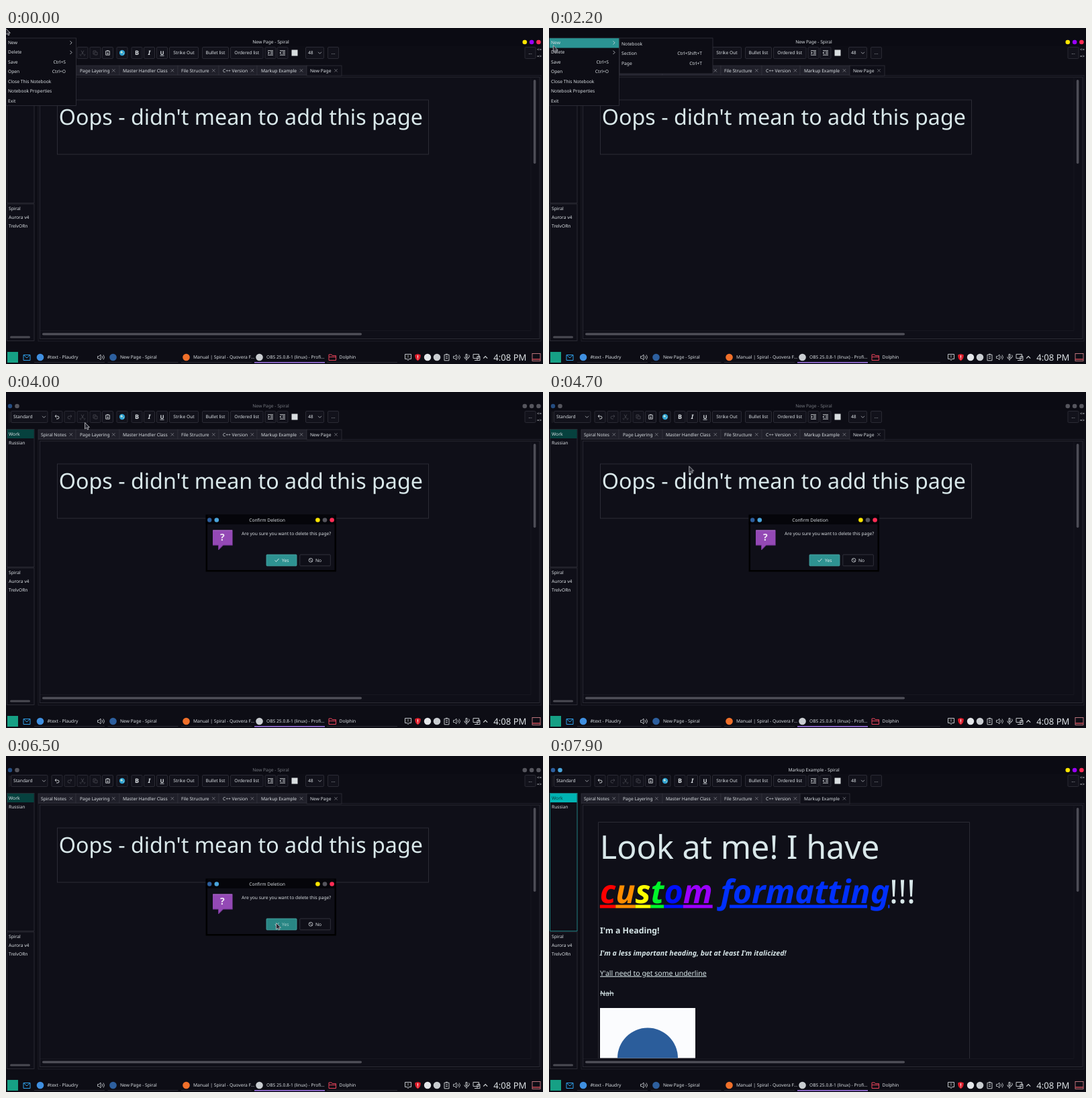
An HTML page for the animation above (8000 ms loop, 800 by 500 pixels).

```html
<!DOCTYPE html>
<html lang="en">
<head>
<meta charset="utf-8">
<title>Deleting a page</title>
<style>
html, body { margin: 0; width: 100%; height: 100%; overflow: hidden; background: #0d0d15; }
svg { display: block; width: 800px; height: 500px; }
text { font-family: "Noto Sans", sans-serif; font-size: 6.7px; fill: #dbe0e4; white-space: pre; text-rendering: geometricPrecision; }
.mid { text-anchor: middle; }
.end { text-anchor: end; }
.b { font-weight: 700; }
.i { font-style: italic; }
.dim { fill: #767980; }
.doc { fill: #d9e8ea; }
.u { text-decoration: underline; text-decoration-skip-ink: none; }
.s { text-decoration: line-through; }
#cursor { animation: move 8s infinite; }
@keyframes move {
  0% { transform: translate(-1px, 0); animation-timing-function: step-end; }
  21.25% { transform: translate(1px, 8px); animation-timing-function: steps(2); }
  23.75% { transform: translate(4px, 17px); animation-timing-function: steps(5); }
  30% { transform: translate(7px, 31px); animation-timing-function: step-end; }
  33.75% { transform: translate(13px, 31px); animation-timing-function: steps(5); }
  40% { transform: translate(113px, 43px); animation-timing-function: steps(3); }
  43.75%, 56.25% { transform: translate(117px, 45px); animation-timing-function: steps(5); }
  62.5% { transform: translate(345px, 207px); animation-timing-function: steps(3); }
  66.25%, 100% { transform: translate(402px, 248px); }
}
</style>
</head>
<body>
<svg id="stage" viewBox="0 0 800 500" xmlns="http://www.w3.org/2000/svg"></svg>
<script>
const LOOP = 8000, TEAL = '#2b9393', LINE = '#31313b', INK = '#d5dadd', OFF = '#43444c';
let css = '', count = 0;

const text = (x, y, s, cls = '', style = '') => `<text x="${x}" y="${y}" class="${cls}" style="${style}">${s}</text>`;
const rect = (x, y, w, h, fill, stroke = 'none', r = 0) =>
  `<rect x="${x}" y="${y}" width="${w}" height="${h}" rx="${r}" fill="${fill}" stroke="${stroke}" stroke-width=".8"/>`;
const dot = (x, y, r, fill) => `<circle cx="${x}" cy="${y}" r="${r}" fill="${fill}"/>`;
const path = (d, stroke = INK, w = .9, fill = 'none') => `<path d="${d}" stroke="${stroke}" stroke-width="${w}" fill="${fill}"/>`;
const at = (x, y, s) => `<g transform="translate(${x} ${y})">${s}</g>`;

// Shows its content only from a to b (ms) of each loop.
function during(a, b, s) {
  const name = 'show' + count++;
  css += `@keyframes ${name}{0%{opacity:0}${a / LOOP * 100}%{opacity:1}${b / LOOP * 100}%{opacity:${b < LOOP ? 0 : 1}}}`;
  return `<g style="animation:${name} ${LOOP}ms step-end infinite">${s}</g>`;
}

const arrowDown = (x, y) => path(`M${x - 2.5} ${y - 1.2}l2.5 2.5l2.5 -2.5`, '#a5a9ae');
const cross = (x, y) => path(`M${x - 2.2} ${y - 2.2}l4.4 4.4m0 -4.4l-4.4 4.4`, '#8a8c92', .7);
const button = (x, w, s = '') => rect(x, 28.5, w, 17, '#12121b', LINE, 1.5) + s;

function titleBar(title, on) {
  const lights = on ? ['#ffe500', '#9a00ff', '#ff2d55'] : ['#55555d', '#55555d', '#55555d'];
  return dot(6, 21, 3.2, on ? '#2d5f9e' : '#244c80') + dot(16.5, 21, 3.3, on ? '#4aa5dc' : '#55555d') +
    text(394.5, 23.3, title + ' - Spiral', on ? 'mid' : 'mid dim') +
    lights.map((c, i) => dot(772.8 + i * 10.3, 21, 3.3, c)).join('');
}

function toolbar() {
  const icons = [
    [76, INK, 'M-1 -3l-2 2l2 2M-3 -1h4a2 2 0 0 1 0 4h-2'],
    [95, OFF, 'M1 -3l2 2l-2 2M3 -1h-4a2 2 0 0 0 0 4h2'],
    [114, OFF, 'M-2 -3.5l3.5 6M2 -3.5l-3.5 6M-2.8 2a1 1 0 1 0 1 1.5M2.8 2a1 1 0 1 1 -1 1.5'],
    [133, OFF, 'M-3 -3h4v1M-3 -3v5h1M-1 -1h4v4h-4z'],
    [151.5, INK, 'M-2.8 -2.8h5.6v6h-5.6zM-1.2 -3.3h2.4M-1.2 0h2.4M-1.2 1.6h2.4'],
    [394, INK, 'M-4 -3.3h8M0 -1.2h4M0 1h4M-4 3.2h8M-4 -1.5l2.4 1.5l-2.4 1.5'],
    [412, INK, 'M-4 -3.3h8M0 -1.2h4M0 1h4M-4 3.2h8M-1.7 -1.5l-2.4 1.5l2.4 1.5']
  ];
  return path('M4.5 29v17M6 29v17', '#25252e', .6) +
    button(7.5, 54.5, text(11, 39.4, 'Standard') + arrowDown(56.5, 37)) +
    icons.map(([x, c, d]) => button(x - 8, 16, at(x, 37, path(d, c)))).join('') +
    button(165, 16, dot(173, 37, 4.2, '#2d9fd0') + path('M171 34.5l2 0l1 2l-2 1.5l-1.5 -1.5zM174.5 37.5l1.5 .5l-1 2z', 'none', 0, '#bfe3d4')) +
    button(187, 16, text(195, 40.3, 'B', 'mid b', 'font-size:9px')) +
    button(205.5, 16, text(213.5, 40.3, 'I', 'mid b i', 'font-size:9px')) +
    button(224.5, 16, text(232.5, 39.8, 'U', 'mid b u', 'font-size:8px')) +
    button(243.5, 43, text(265, 39.4, 'Strike Out', 'mid')) +
    button(292.5, 39, text(312, 39.4, 'Bullet list', 'mid')) +
    button(334.5, 48.5, text(358.7, 39.4, 'Ordered list', 'mid')) +
    rect(425.5, 32.5, 9, 9, '#d9dee0') +
    button(446.5, 27, text(450, 39.4, '48') + arrowDown(467.5, 37)) +
    button(479.5, 16, text(487.5, 39, '...', 'mid')) + button(773, 16, text(781, 39, '...', 'mid')) +
    text(791, 33.8, '&lt;=', '', 'font-size:6px') + text(791, 44.3, '=&gt;', '', 'font-size:6px');
}

function tab(x, w, label, tx, cx, on) {
  return rect(x, 56, w, on ? 15 : 14, on ? '#0f0f18' : '#20202a', LINE) + text(tx, 65.8, label) + cross(cx, 63.3);
}

function frame() {
  return rect(0, 0, 800, 500, '#0d0d15') + rect(0, 0, 800, 27, '#0b0b13') + toolbar() +
    rect(1.5, 55.5, 40.5, 205, '#0f0f18', LINE) + rect(1.5, 262, 40.5, 203.5, '#0f0f18', LINE) +
    ['Spiral', 'Aurora v4', 'TrelvORn'].map((s, i) => text(4, 271 + i * 12.9, s)).join('') +
    rect(6, 458.5, 30, 3, '#4a4a52', 'none', 1.5) +
    rect(48, 70.5, 749, 395.5, '#0d0d15', '#25252e') + rect(50.5, 73, 744.5, 389.5, '#0f0f18', LINE) +
    path('M782 74v376M51 450.5h731', '#1b1b24', .7) +
    rect(785.8, 77, 3.6, 125, '#4d4d56', 'none', 1.8) + rect(54, 453.8, 476, 3.4, '#4d4d56', 'none', 1.7) +
    tab(48, 56, 'Spiral Notes', 52, 96.8) + tab(104, 65, 'Page Layering', 110, 160.3) +
    tab(169, 87, 'Master Handler Class', 174, 247.8) + tab(256, 61, 'File Structure', 261, 309.3) +
    tab(317, 57, 'C++ Version', 323, 366.8);
}

const sidebar = on => rect(2, 55.8, 39.7, 13.2, on ? '#00b3b3' : '#06413e') +
  (on ? rect(1.5, 55.5, 40.5, 205, 'none', '#168a8a') : '') +
  text(4, 65, 'Work', '', on ? 'fill:#0b3c3f' : '') + text(4, 77.8, 'Russian');

const wrongPage = () => tab(374, 74, 'Markup Example', 380, 440) + tab(448, 52, 'New Page', 453, 491.5, true) +
  rect(76.5, 107, 553, 81, 'none', '#33333d') + text(78.8, 143.8, "Oops - didn't mean to add this page", 'doc', 'font-size:32.25px');

function markupPage() {
  const hues = ['#ff0000', '#ff8c00', '#ffff00', '#00f52a', '#0010ff', '#9b00ff'];
  const rainbow = [...'custom'].map((c, i) => `<tspan class="u" style="fill:${hues[i]}">${c}</tspan>`).join('');
  return tab(374, 74, 'Markup Example', 380, 440, true) +
    path('M73.5 450V98.5H626.5V450', '#33333d', .8) +
    text(75.8, 152.5, 'Look at me! I have', 'doc', 'font-size:48.5px') +
    text(75.8, 218.5, rainbow, 'b i', 'font-size:48.5px') +
    text(255.6, 218.5, 'formatting', 'b i u', 'font-size:48.5px;fill:#0030ff') +
    text(507, 218.5, '!!!', 'doc', 'font-size:48.5px') +
    text(76, 263.7, "I'm a Heading!", 'doc b', 'font-size:12.3px') +
    text(75.8, 296.7, "I'm a less important heading, but at least I'm italicized!", 'doc b i', 'font-size:10.6px') +
    text(76.1, 326.7, "Y'all need to get some underline", 'doc u', 'font-size:10.5px') +
    text(76.1, 356.5, 'Nah', 'doc s', 'font-size:10.5px') +
    rect(76, 375, 142, 74.5, '#fbfcfe') + path('M102 449.5a45 45 0 0 1 90 0z', 'none', 0, '#2b5d9b');
}

function taskbar() {
  const speaker = path('M-4.5 -1.5h2l2.5 -2.5v8l-2.5 -2.5h-2zM2 -2q2 2 0 4M4 -3.5q3 3.5 0 7', INK, .8);
  const tasks = [
    [42, 51, '#3f8fe0', '#text - Plaudry'], [151.5, 159.5, '#2d5f9e', 'New Page - Spiral'],
    [261, 268.5, '#f0702a', 'Manual | Spiral - Quovera F...'], [370, 377.5, '#c9cdd1', 'OBS 25.0.8-1 (linux) - Profi...'],
    [478, 486, '', 'Dolphin']
  ];
  return rect(0, 479, 800, 21, '#0d0d15') + rect(2, 482, 16, 16, '#16a085') +
    path('M26 486.5h10v8h-10zl5 4.5l5 -4.5', '#2f9fe8', 1) +
    tasks.map(([x, ix, c, s], i) => (c ? dot(ix, 490, 5.3, c) : '') + text(ix + 10.5, 492.4, s) +
      rect(x, 497, 105, i == 3 ? 1.5 : .8, i == 3 ? '#a77bf0' : '#34343e')).join('') +
    path('M481 494.5v-8.5h4l1 1.5h5.5v7zM481 489.5h10.5', '#e8435a', 1) +
    at(141, 490, speaker) +
    path('M594.5 485.5h9v7h-3l-1.5 2l-1.5 -2h-3zM599 487v2.5M599 490.5v1') +
    path('M613.5 485l4.2 1.3q.6 6 -4.2 9q-4.8 -3 -4.2 -9z', 'none', 0, '#e01f2d') + path('M613.5 487v4M613.5 492v1', '#fff', 1) +
    dot(628, 490, 5.2, '#e4e7ea') + dot(642, 490, 5.3, '#c9cdd1') +
    path('M653 486.2h7v8.6h-7zM655 485.3h3M655 489h3M655 491.5h3') +
    at(671, 490, speaker) +
    path('M685 485.5h2v5h-2zM682.8 489.5q0 3 3.2 3t3.2 -3M686 492.5v2.5') + path('M689.5 486.5q2 2 0 4') +
    path('M696 485.5h8.5v6h-8.5zM698 494.5h4M702 488.5h4v6h-4z') +
    path('M711.2 491.6l3 -3l3 3', INK, 1.1) +
    text(726.3, 494.8, '4:08 PM', '', 'font-size:13.1px') +
    rect(784, 484.5, 12, 11, 'none', '#e08a92') + path('M784 493h12', '#e0525f', 1.4);
}

const panel = (x, y, w, h) => rect(x, y, w, h, '#0d0d15', '#32323c');
const hilite = (x, y, w) => rect(x, y, w, 14.4, TEAL);
const next = y => path(`M95.5 ${y - 2.6}l2.6 2.6l-2.6 2.6`, INK, .8);

function menus() {
  const items = [['New'], ['Delete'], ['Save', 'Ctrl+S'], ['Open', 'Ctrl+O'], ['Close This Notebook'], ['Notebook Properties'], ['Exit']];
  const rows = (list, x, y, right) => list.map(([s, key], i) =>
    text(x, y + i * 14.45, s) + (key ? text(right, y + i * 14.45, key, 'end') : '')).join('');
  const sub = panel(105, 29.3, 115, 29);
  return panel(.4, 15, 104, 100.5) +
    during(1800, 2400, hilite(.8, 15.2, 103.4)) + during(2400, 3700, hilite(.8, 29.4, 103.4)) +
    rows(items, 3, 24, 89) + next(21.9) + next(36.4) +
    during(2000, 2400, panel(105, 15, 139, 53) + rows([['Notebook'], ['Section', 'Ctrl+Shift+T'], ['Page', 'Ctrl+T']], 108, 26, 228)) +
    during(2700, 3700, sub + during(3000, 3300, hilite(105, 29.4, 114.8)) + during(3300, 3700, hilite(105, 43.8, 114.8)) +
      rows([['Current Section', 'Ctrl+Shift+W'], ['Current Page', 'Ctrl+W']], 108, 38.6, 204.5));
}

function dialog() {
  const yes = (fill, ink) => rect(388, 242, 45, 16.8, fill, '#4aa9a7', 1) + path('M400.5 250.5l2 2l4 -4.5', ink, .9) +
    text(411, 252.8, 'Yes', '', `fill:${ink}`);
  return rect(298, 183, 193.5, 84, '#0f0f18', '#000') + rect(297.5, 182.5, 194.5, 14.5, '#05050a') +
    path('M299 183v83h191.5v-83', '#000', 2) +
    dot(303.2, 190.5, 3.2, '#2d5f9e') + dot(313.8, 190.5, 3.3, '#4aa5dc') + text(389, 192.8, 'Confirm Deletion', 'mid') +
    dot(464.4, 190.5, 3.3, '#ffe500') + dot(475, 190.5, 3.3, '#55555d') + dot(485.6, 190.5, 3.3, '#ff2d55') +
    path('M308 205.5h29.5v22.5h-14l-7 7v-7h-8.5z', 'none', 0, '#9449b5') + path('M308 228h8.5v7l7 -7h14', '#6f3191', 1) +
    path('M308.5 206h28.5', '#b57ad0', .8) +
    text(322.3, 221.3, '?', 'mid b', 'font-size:14px;fill:#f3eaf7') +
    text(351, 212.8, 'Are you sure you want to delete this page?') +
    during(3800, 5200, yes('#2e9291', '#e4eeee')) + during(5200, 6800, yes('#298684', '#a8cfce')) +
    rect(437.8, 242, 45.5, 16.8, '#0f0f18', '#3a3a44', 1) +
    '<circle cx="454" cy="250.3" r="2.9" fill="none" stroke="#d5dadd" stroke-width=".8"/>' + path('M452 248.3l4 4', INK, .8) +
    text(461, 252.8, 'No');
}

const cursor = '<g id="cursor">' + path('M.5 .5V10L2.9 8.1L4.4 11L6 10.2L4.7 7.4H7.4Z', '#c4c7cb', .8, '#2c2c35') + '</g>';

document.getElementById('stage').innerHTML = frame() +
  during(0, 6800, wrongPage()) + during(6800, LOOP, markupPage()) +
  during(0, 6800, sidebar(false)) + during(6800, LOOP, sidebar(true)) +
  during(0, 3800, titleBar('New Page', true)) + during(3800, 6800, titleBar('New Page', false)) +
  during(6800, LOOP, titleBar('Markup Example', true)) +
  taskbar() + during(0, 3700, menus()) + during(3800, 6800, dialog()) + during(0, 6800, cursor);

const sheet = document.createElement('style');
sheet.textContent = css;
document.head.append(sheet);
</script>
</body>
</html>
```
